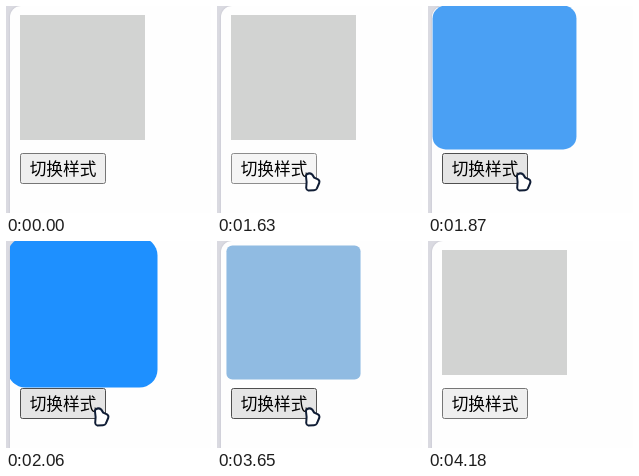
An HTML page for the animation above (4980 ms loop, 205 by 207 pixels).

```html
<!DOCTYPE html>
<html lang="zh-CN">
<head>
<meta charset="utf-8">
<title>切换样式</title>
<style>
  html, body { margin: 0; width: 100%; height: 100%; overflow: hidden; background: #dadae1; }
  body { position: relative; }
  .panel {
    position: absolute; left: 4px; top: 0; width: 230px; height: 240px;
    background: #fefefe; border-top-left-radius: 11px;
    box-shadow: 0 0 2px #b9b9c4;
  }
  .view { position: absolute; left: 4px; top: 0; right: 0; bottom: 0; overflow: hidden; }
  .box { position: absolute; left: 10px; top: 9px; width: 125px; height: 125px; }
  .button {
    position: absolute; left: 10px; top: 147px; width: 86px; height: 31px;
    box-sizing: border-box; border: 1px solid; border-radius: 2.5px;
    font: 16.67px/29px "Noto Sans CJK SC", "Noto Sans CJK", sans-serif;
    color: #000; text-align: center; white-space: nowrap;
  }
  .cursor { position: absolute; left: 0; top: 0; width: 205px; height: 207px; overflow: visible; }
</style>
</head>
<body>
<div class="panel"></div>
<div class="view">
  <div class="box"></div>
  <div class="button">切换样式</div>
</div>
<svg class="cursor" viewBox="0 0 205 207">
  <path d="M90 168.2 Q92.5 166.4 95.3 168.6 L97.2 171.6 L101 173.4 Q103 174.6 102.2 177 L99.8 182.6 Q99 184.2 97 184.3 L91.4 184.6 Q89.4 184.2 89.2 182 L89.6 176 L89 170.5 Q88.9 169 90 168.2 Z"
    fill="#fff" stroke="#101d35" stroke-width="2" stroke-linejoin="round"/>
</svg>
<script>
const LOOP = 4980;
const box = document.querySelector('.box');
const button = document.querySelector('.button');
const cursor = document.querySelector('.cursor');

const looks = {
  rest: ['#efefef', '#767676'],
  hover: ['#e5e5e5', '#4f4f4f'],
  active: ['#f5f5f5', '#8d8d8d']
};

// [time, progress from plain grey to large rounded blue]
const morph = [
  [0, 0], [1740, .025], [1780, .22], [1820, .5], [1870, .755],
  [1920, .9], [1960, .965], [2010, .997], [2060, 1],
  [3560, .97], [3610, .66], [3650, .365], [3690, .16], [3740, .04], [3790, 0]
];

// [time, x, y] as an offset from the resting place; null hides the cursor
const path = [[0, null]];
for (let i = 0; i <= 10; i++) {
  const left = (1 - i / 10) ** 2;
  path.push([290 + Math.round(i * 4.6) * 10, 29 * left, 38 * left]);
}
path.push([4030, 10, 4], [4080, 45, 14], [4130, 91, 24], [4180, null]);

const presses = [[1630, 1740], [3420, 3560]];
const grey = [210, 211, 210], blue = [30, 144, 255];

const held = (steps, t) => steps.findLast(step => step[0] <= t);
const mix = (a, b, p) => a + (b - a) * p;

function buttonLook(t, x, y) {
  if (presses.some(([from, to]) => t >= from && t < to)) return looks.active;
  return x !== null && x < 11 && y < 12 ? looks.hover : looks.rest;
}

function draw(now) {
  const t = now % LOOP;
  const p = held(morph, t)[1];
  box.style.background = `rgb(${grey.map((c, i) => Math.round(mix(c, blue[i], p)))})`;
  box.style.borderRadius = `${15 * p}px`;
  box.style.transform = `scale(${1 + .2 * p})`;

  const [, x, y] = held(path, t);
  cursor.style.visibility = x === null ? 'hidden' : 'visible';
  if (x !== null) cursor.style.transform = `translate(${x}px, ${y}px)`;

  const [fill, edge] = buttonLook(t, x, y);
  button.style.background = fill;
  button.style.borderColor = edge;
}

const start = performance.now();
function tick() {
  draw(performance.now() - start);
  requestAnimationFrame(tick);
}
tick();
</script>
</body>
</html>
```
